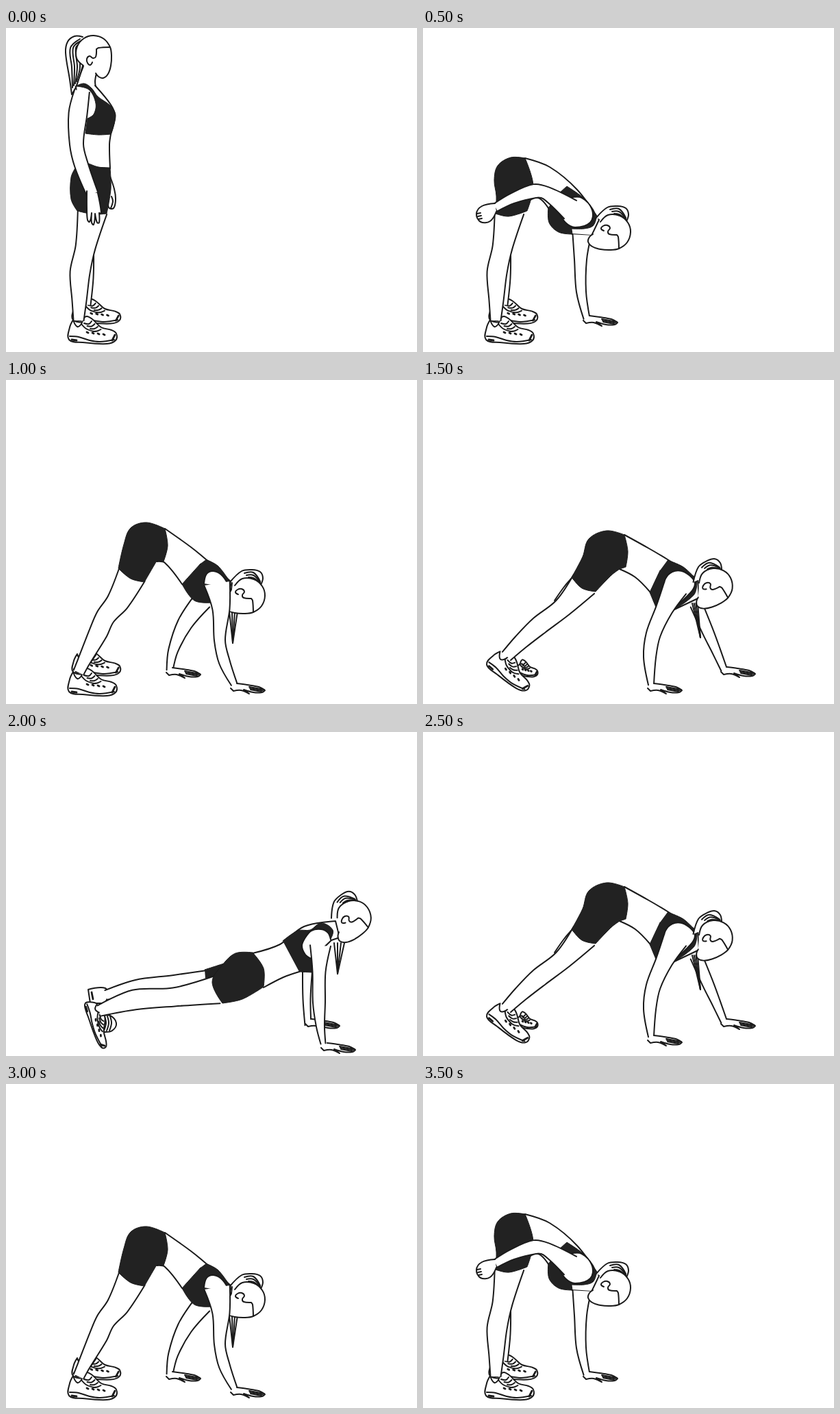
An HTML page for the animation above (4000 ms loop, 600 by 473 pixels).

```html
<!DOCTYPE html>
<html lang="en">
<head>
<meta charset="utf-8">
<title>Walkout exercise</title>
<style>
html, body { margin: 0; width: 100%; height: 100%; overflow: hidden; background: #fff; }
svg { display: block; width: 600px; height: 473px; }
path {
  stroke: #1a1a1a; stroke-width: 2; stroke-linecap: round; stroke-linejoin: round;
  fill: none; vector-effect: non-scaling-stroke;
}
.skin { fill: #fff; }
.flesh { fill: #fff; stroke: none; }
.dark { fill: #222; stroke-width: 1; }
.bold { stroke-width: 2.8; }
</style>
</head>
<body>
<svg id="stage" viewBox="0 0 600 473"></svg>
<script>
// Points are "x,y" or "x,y,width"; "!" marks a corner.
const parse = text => text.trim().split(/\s+/).map(s => {
  const [x, y, w] = s.replace('!', '').split(',').map(Number);
  return { x, y, w, corner: s.endsWith('!') };
});

function heading(pts, i) {
  const a = pts[i - 1] || pts[i], b = pts[i + 1] || pts[i];
  const len = Math.hypot(b.x - a.x, b.y - a.y) || 1;
  return [(b.x - a.x) / len, (b.y - a.y) / len];
}

function curve(pts) {
  const tangent = i =>
    pts[i].corner || i === 0 || i === pts.length - 1 ? [0, 0] : heading(pts, i);
  return pts.slice(1).reduce((d, q, i) => {
    const p = pts[i], k = Math.hypot(q.x - p.x, q.y - p.y) / 3;
    const [ax, ay] = tangent(i), [bx, by] = tangent(i + 1);
    return d + `C${p.x + ax * k},${p.y + ay * k} ${q.x - bx * k},${q.y - by * k} ${q.x},${q.y}`;
  }, `M${pts[0].x},${pts[0].y}`);
}

const path = (cls, d) => `<path class="${cls}" d="${d}"/>`;
const draw = cls => text => path(cls, curve(parse(text)));
const line = draw('line'), skin = draw('skin'), bold = draw('bold'), dark = draw('dark');
const repeat = (n, fn) => Array.from({ length: n }, (_, i) => fn(i)).join('');
const place = (parts, x, y, angle = 0, sx = 1, sy = sx) =>
  `<g transform="translate(${x} ${y}) rotate(${angle}) scale(${sx} ${sy})">${parts}</g>`;

// Tapered limb with open ends, along a centre line
function limb(text) {
  const mid = parse(text);
  const side = s => mid.map((p, i) => {
    const [tx, ty] = heading(mid, i);
    return { x: p.x - ty * s * p.w / 2, y: p.y + tx * s * p.w / 2 };
  });
  const left = curve(side(1)), right = curve(side(-1).reverse());
  return path('flesh', left + right.replace('M', 'L') + 'Z') + path('line', left) + path('line', right);
}

// Body parts around their own origin
const shoe =
  skin('6,-31 1,-20 0,-2 20,2 55,4 68,-1 69,-11 62,-16 47,-20 34,-32 26,-36 21,-33 18,-25 12,-21 6,-31') +
  line('1,-7 14,-6 30,-1 45,1 66,-2') + line('18,-25 25,-18 36,-14') +
  repeat(4, i => line(`${22 + 4.5 * i},${-26 + 4 * i} ${29 + 4 * i},${-25 + 3.5 * i} ${33 + 4.5 * i},${-29 + 4 * i}`)) +
  repeat(4, i => bold(`${26 + 8 * i},${-13 + i} ${28 + 8 * i},${-12 + i}`)) +
  bold('4,-2 11,-1') + bold('63,-1 67,-9');

const hand =
  skin('-5,3 -1,7! 10,6 22,11! 14,5! 28,9 41,9 45,6! 36,1 19,-2 4,-4') +
  repeat(3, i => line(`${22 + i},${1 + 2 * i} ${44 - 2 * i},${5 + 1.5 * i}`));

const bun = skin('-20,25 -36,8 -38,-7 -35,-19 -26,-23 -16,-20') +
  repeat(3, i => line(`${-33 + 3 * i},${4 - 3 * i} ${-34 + 4 * i},-9 ${-21 + i},-19`));

const longHair = skin('-16,-24 -28,-25 -38,-17 -41,-1 -35,38 -32,60! -25,47 -16,18') +
  repeat(4, i => line(`${-20 + i},${-21 + 3 * i} ${-34 + 4 * i},-8 ${-32 + 4 * i},20 ${-31 + 2 * i},${50 - 3 * i}`));

const skull =
  skin('-15,18 -25,7 -24,-10 -14,-22 0,-26 15,-21 24,-9 26,3 25,18 21,30 14,36 7,34 3,29') +
  line('24,-9 7,-8 4,-6! 3,5 -1,7 -6,4 -10,8 -9,14 -5,17 -2,13');

const head = (x, y, angle, hair = bun) => place(hair + skull, x, y, angle);

// Loose hair falling to a point
const tail = (x, y, w, tipX, tipY) => repeat(4, i =>
  line(`${x + w * i / 3},${y} ${(x + tipX + w * i / 3) / 2},${(y + tipY) / 2} ${tipX},${tipY}`));

const farShoe = place(shoe, 98, 428, 0, 0.99, 0.9);
const nearShoe = place(shoe, 92, 457);
const legs = farShoe + limb('121,328,14 122,365,11 118,404,11') + nearShoe +
  limb('126,268,43 116,320,29 108,357,29 107,398,21 106,427,15');

const stand = legs +
  skin('113,56 104,80 103,86! 131,86! 130,78 132,66') +
  head(128, 37, 0, longHair) +
  skin('102,85! 112,177! 121,203! 152,205! 151,170 153,155! 159,128 153,112 130,84') +
  skin('152,217 158,235 160,250 157,263 150,262 150,250') + line('154,246 156,253 153,263') +
  dark('121,198! 135,203 152,204! 153,235 147,271! 128,272 104,267! 95,250 95,218 102,203!') +
  limb('111,92,22 105,125,27 103,170,20 110,200,20 126,242,17') +
  skin('118,238 118,264 119,280 122,283 125,270! 125,284 128,287 130,271! 133,284 136,284 136,270! 139,270 134,241') +
  dark('102,85! 114,81 125,88 134,100 153,114 160,128 153,155! 135,156 116,154! 119,132! 128,126 131,110 121,90 102,85');

const fold = legs +
  skin('149,190 185,203 225,236 257,280! 246,303! 218,301! 183,263! 168,248 150,255') +
  limb('232,302,27 230,338,18 231,385,14 239,424,9') + place(hand, 239, 424) +
  dark('149,190! 128,189 109,201 104,222 107,245 106,271! 125,275 152,267! 161,230 149,190') +
  dark('199,241! 210,231! 233,247 248,264 253,278! 248,289 235,293 217,293! 218,301! 198,298 184,284 183,262!') +
  skin('214,248 232,248 247,266 244,284 222,291 208,284 198,268') +
  limb('215,265,32 180,241,19 163,238,20 130,249,15 106,262,12') +
  skin('105,256 86,260 78,271 84,283 98,282 107,268') +
  repeat(3, i => line(`${79 + i},${271 + 4 * i} ${84 + i},${270 + 4 * i}`)) +
  head(277, 298, 90);

const pike = farShoe + line('124,412 132,400') + nearShoe +
  limb('184,284,42 163,324,33 145,346,28 135,368,27 113,412,18 106,427,16') +
  limb('286,323,28 261,356,22 244,395,14 239,424,9') + place(hand, 239, 424) +
  skin('232,217 270,244 292,262 330,296! 326,333! 301,325! 257,298! 232,267 220,265') +
  dark('232,217! 205,208 182,216 172,240 164,275! 182,290 202,295! 220,264! 230,265! 236,242 232,217') +
  dark('292,262! 310,272 329,298! 327,304! 301,325! 275,322 257,298! 284,268') +
  tail(326, 338, 12, 331, 384) + head(352, 315, 90) +
  skin('289,297 293,283 303,279 316,286 327,304') +
  limb('308,297,38 314,335,25 312,380,16 319,412,16 333,444,9') + place(hand, 333, 447);

const reach = place(shoe, 131, 429, 4, 0.52, 0.6) +
  place(shoe, 92, 417, 33, 1, 0.92) +
  line('219,287 206,302 192,322') +
  limb('235,298,41 204,332,28 170,358,27 143,382,22 122,403,17') +
  limb('399,328,18 417,370,16 427,393,13 440,424,9') + place(hand, 440, 423) +
  tail(393, 326, 8, 405, 376) +
  skin('294,226 330,246 357,262 401,291! 403,318! 365,336! 332,310! 310,288 287,276') +
  dark('294,226! 268,220 242,232 233,258 217,288! 232,304 252,309! 275,285 287,276! 296,273! 299,250 294,226') +
  dark('357,263! 380,273 400,292! 396,313 365,336! 341,334! 331,310! 346,278') +
  skin('351,305 354,290 364,280 378,279 392,288 397,298 390,311 365,334') +
  limb('368,304,36 352,335,25 336,372,21 331,405,18 333,445,8') + place(hand, 333, 447) +
  head(426, 301, 62);

const plank =
  skin('120,376 123,396! 143,396! 148,388 145,374 120,376') + bold('125,380 127,390') +
  limb('146,384,14 190,374,24 245,367,24 300,354,14') +
  dark('290,347! 318,338! 305,358! 291,359!') +
  skin('137,415 152,414 161,425 155,436 143,438') +
  repeat(3, i => line(`${144 + 4 * i},415 ${146 + 4 * i},425 ${143 + 4 * i},436`)) +
  place(shoe, 114, 398, 68, 1, 0.6) +
  limb('136,407,16 187,391,29 245,387,27 309,376,41') +
  limb('440,350,14 439,390,11 441,428,9') + place(hand, 442, 423) +
  skin('360,323 400,310 435,284 481,276! 487,300! 475,304! 428,350! 405,358 376,373') +
  dark('360,322! 335,323 316,340 301,365 316,396! 345,390 376,372! 376,345 360,322') +
  dark('404,305! 426,290 444,289 460,279 477,289 474,302! 447,331! 447,351! 428,350!') +
  tail(479, 308, 15, 484, 353) + head(507, 272, 52) +
  skin('446,331 437,325 432,312 437,300 446,290 460,288 470,293 474,303') +
  limb('459,312,30 457,350,19 457,395,18 459,430,12 463,455,7') + place(hand, 465, 458);

const poses = [stand, fold, pike, reach, plank];
const last = poses.length - 1;
const step = 500;

const stage = document.getElementById('stage');
stage.innerHTML = poses.map(p => `<g visibility="hidden">${p}</g>`).join('');
const groups = [...stage.children];

// Walk out to the plank and back again
function show() {
  const beat = Math.floor(performance.now() / step) % (2 * last);
  const now = last - Math.abs(last - beat);
  groups.forEach((g, i) => g.setAttribute('visibility', i === now ? 'visible' : 'hidden'));
  requestAnimationFrame(show);
}
show();
</script>
</body>
</html>
```
